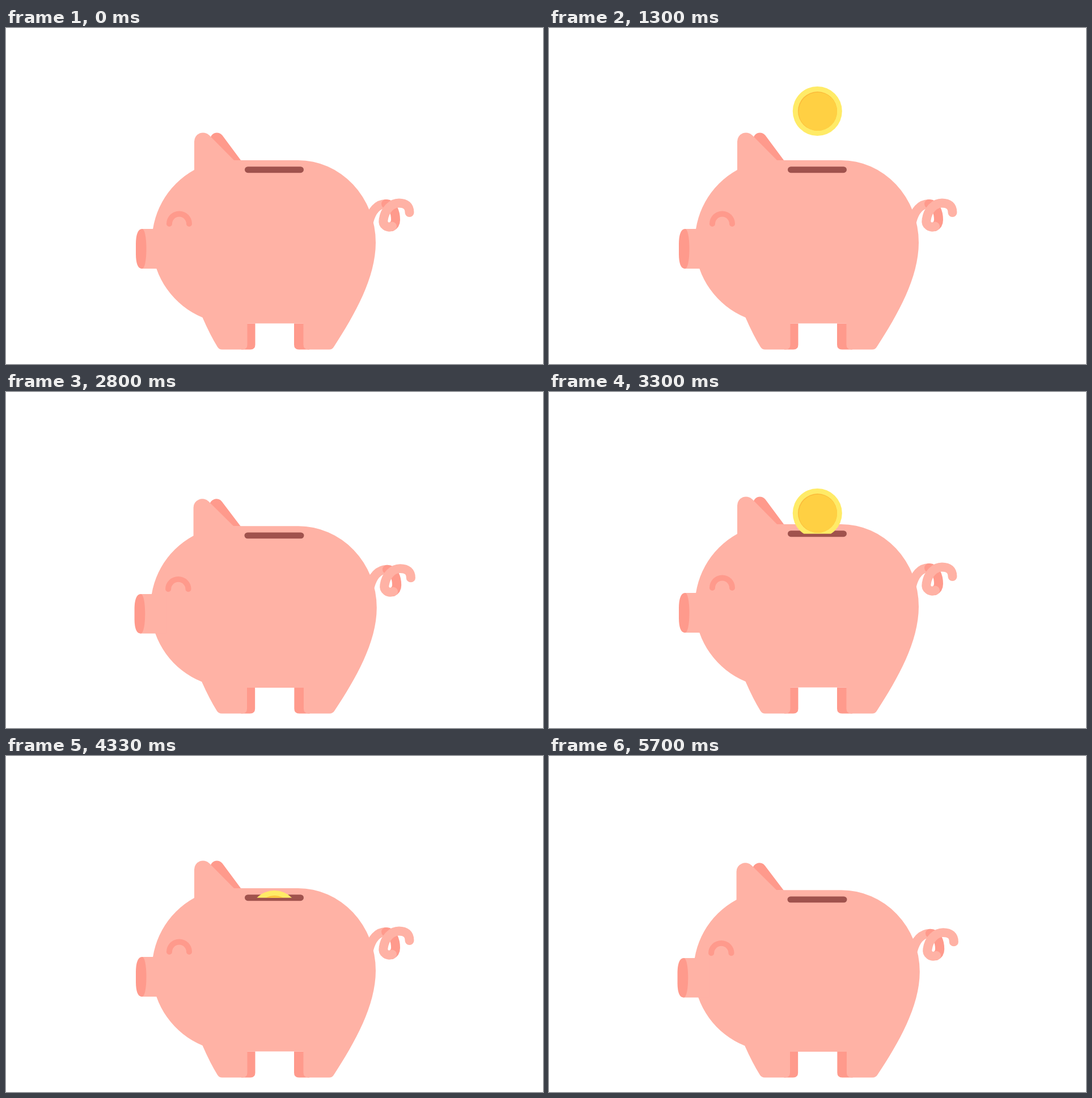
An HTML page with a canvas for the animation above (5730 ms loop, 947 by 592 pixels).

```html
<!DOCTYPE html>
<html lang="en">
<head>
<meta charset="utf-8">
<title>Piggy bank</title>
<style>
  html, body { margin: 0; width: 100%; height: 100%; overflow: hidden; background: #fff; }
  canvas { display: block; width: 947px; height: 592px; }
</style>
</head>
<body>
<canvas id="stage"></canvas>
<script>
const W = 947, H = 592, LOOP = 5730;
const PINK = '#ffb2a5', ROSE = '#ff9a8c', SLOT = '#a0524d';
const SLOT_Y = 249.7, GROUND = 566.5;

const canvas = document.getElementById('stage');
const ctx = canvas.getContext('2d');
const dpr = window.devicePixelRatio || 1;
canvas.width = W * dpr;
canvas.height = H * dpr;

const shapes = {
  body: `M332 250 V200 A15.5 15.5 0 0 1 358.5 189 L402 233 H515
    A137 145 0 0 1 652 378 C652 440 615 505 578 562 Q575 566.5 570 566.5
    H533 Q524.5 566.5 524.5 558 V520.5 H425.5 V558 Q425.5 566.5 417 566.5
    H381 Q376 566.5 373 562 Q360 541 346.5 510 A144.5 144.5 0 0 1 332 250 Z`,
  farEar: 'M360 196.5 A12 12 0 0 1 381.6 189.3 L414.5 233.5 H390 Z',
  farLegs: `M415 520.5 H439.5 V558 Q439.5 566.5 431 566.5 H415 Z
    M535 520.5 H508 V558 Q508 566.5 516.5 566.5 H535 Z`,
  snout: 'M239 354 H285 V424 H239 Z',
  nose: `M240 354 C232 354 229 366 229 381 V397 C229 414 232 424 240 424
    C245 424 247.5 407 247.5 389 C247.5 371 245 354 240 354 Z`,
  eye: 'M288 345 A17.5 17.5 0 0 1 323 345',
  slot: 'M426.5 249.7 H519.5',
  tailRoot: 'M640 341 C645 322 655 310 670 310',
  tailBack: 'M670 310 C682 310 687 325 687 338 C687 344 684 348 680 350',
  tailCurl: `M681 349.5 C672 353 664 347 665.5 338 C668 320 680 308.5 693 308.5
    C705 308.5 711.5 314 711.5 325`
};
const paths = {};
for (const name in shapes) paths[name] = new Path2D(shapes[name]);

function fill(name, color) {
  ctx.fillStyle = color;
  ctx.fill(paths[name]);
}

function stroke(name, color, width, cap = 'round') {
  ctx.strokeStyle = color;
  ctx.lineWidth = width;
  ctx.lineCap = cap;
  ctx.stroke(paths[name]);
}

function disc(x, y, r, color) {
  ctx.fillStyle = color;
  ctx.beginPath();
  ctx.arc(x, y, r, 0, Math.PI * 2);
  ctx.fill();
}

function drawPig(squash) {
  ctx.save();
  ctx.translate(W / 2, GROUND);
  ctx.scale(1 + squash, 1 - squash);
  ctx.translate(-W / 2, -GROUND);
  stroke('tailRoot', PINK, 16);
  stroke('tailBack', ROSE, 16);
  stroke('tailCurl', PINK, 16);
  fill('farEar', ROSE);
  fill('farLegs', ROSE);
  fill('body', PINK);
  fill('snout', PINK);
  fill('nose', ROSE);
  stroke('eye', ROSE, 10);
  stroke('slot', SLOT, 11);
  ctx.restore();
}

// The coin disappears below the middle of the slot.
function drawCoin(y) {
  ctx.save();
  ctx.beginPath();
  ctx.rect(0, 0, W, SLOT_Y);
  ctx.clip();
  disc(473.3, y, 43.5, '#ffeb67');
  disc(473.5, y, 34.5, '#fbbb3b');
  disc(474.2, y + 0.7, 33.8, '#ffd043');
  ctx.restore();
}

// Two bounces of three steps each, the second one weaker.
function squashAt(k) {
  if (k < 5 || k > 10) return 0;
  const peak = k < 8 ? 0.05 : 0.02;
  return peak * (1 - ((k - 5) % 3) / 2);
}

function draw(ms) {
  // Poses last 80 ms and are shown on a 30 Hz clock; a drop takes 12 poses.
  const tick = Math.floor((ms + 4) * 0.03);
  const k = (Math.floor(tick / 2.4 + 1e-6) + 10) % 12;
  ctx.setTransform(dpr, 0, 0, dpr, 0, 0);
  ctx.fillStyle = '#fff';
  ctx.fillRect(0, 0, W, H);
  drawPig(squashAt(k));
  if (k < 5) drawCoin(12.5 + 67 * k);
}

const start = performance.now();
function loop() {
  draw((performance.now() - start) % LOOP);
  requestAnimationFrame(loop);
}
loop();
</script>
</body>
</html>
```
